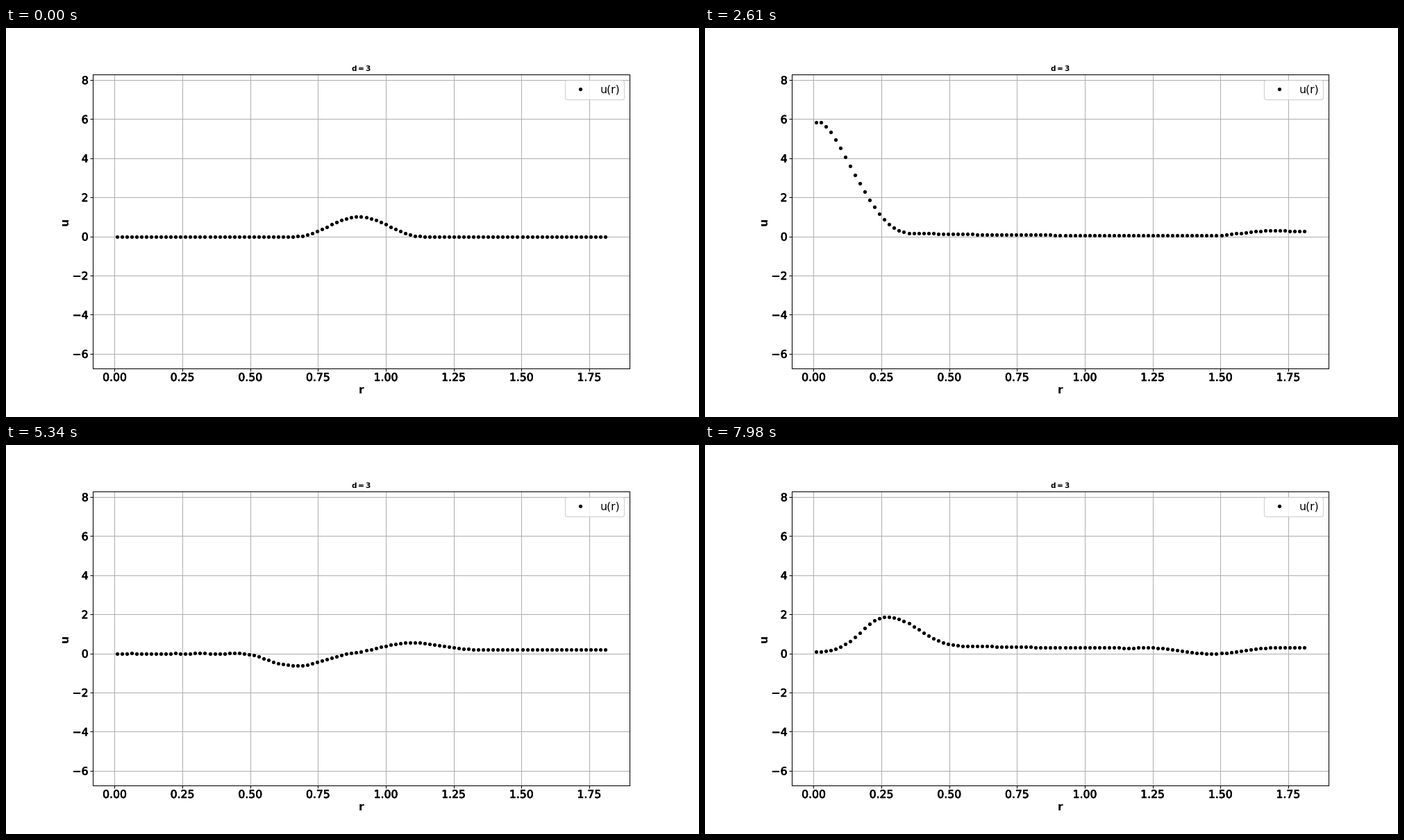
A matplotlib script for the animation above (8 s loop, 998 px wide and 561 px high).

```python
import numpy as np
import matplotlib.pyplot as plt
from matplotlib import patheffects
from matplotlib.animation import FuncAnimation

W, H, DPI = 998, 561, 100
FRAMES, INTERVAL = 267, 30

# Radial wave equation u_tt = u_rr + (d - 1)/r u_r with flat ends
DIM = 3
N = 101
DR = 0.018
DT = DR / 2
CENTRE, HALF_WIDTH = 0.9, 0.2525
PUSH = 0.62  # initial velocity relative to the initial shape

r = (np.arange(N) + 0.5) * DR


def bump(x):
    q = ((x - CENTRE) / HALF_WIDTH) ** 2
    return np.clip(1 - q, 0, None) ** 3


def laplacian(u):
    out = np.zeros_like(u)
    out[1:-1] = ((u[2:] - 2 * u[1:-1] + u[:-2]) / DR**2
                 + (DIM - 1) / r[1:-1] * (u[2:] - u[:-2]) / (2 * DR))
    return out


def flat_ends(u):
    u[0], u[-1] = u[1], u[-2]
    return u


def solve(steps):
    u = np.zeros((steps, N))
    u[0] = bump(r)
    u[1] = flat_ends(u[0] + DT * PUSH * u[0] + DT**2 / 2 * laplacian(u[0]))
    for n in range(1, steps - 1):
        u[n + 1] = flat_ends(2 * u[n] - u[n - 1] + DT**2 * laplacian(u[n]))
    return u


wave = solve(FRAMES)

plt.rcParams["font.family"] = "DejaVu Sans"
FONT = 11.25

fig = plt.figure(figsize=(W / DPI, H / DPI), dpi=DPI, facecolor="white")
ax = fig.add_axes([0.125, 0.125, 0.775, 0.755])

# Vertical scale: 28.2 px per unit, zero line 260.458 px above the bottom
UNIT, ZERO = 28.2, 260.458
ax.set_xlim(-0.081, 1.899)
ax.set_ylim((0.125 * H - ZERO) / UNIT, (0.88 * H - ZERO) / UNIT)
ax.set_xticks(np.arange(0, 1.76, 0.25))
ax.set_yticks(range(-6, 9, 2))
ax.grid(True, color="#b0b0b0", linewidth=0.75)
ax.set_axisbelow(True)
ax.tick_params(length=3.2, width=0.75, pad=1.2, labelsize=FONT)
for spine in ax.spines.values():
    spine.set_linewidth(0.75)
for label in ax.get_xticklabels() + ax.get_yticklabels():
    label.set_path_effects([patheffects.withStroke(linewidth=0.5,
                                                   foreground="black")])

ax.set_xlabel("r", fontsize=FONT, fontweight="bold", labelpad=2.2)
ax.set_ylabel("u", fontsize=FONT, fontweight="bold", labelpad=2.2)
ax.set_title(r"$\mathbf{d=3}$", fontsize=7.6, pad=3.8)

dots, = ax.plot(r, wave[0], "k.", markersize=5.6, markeredgewidth=0.94,
                label="u(r)")
legend = ax.legend(loc="upper right", fontsize=FONT)
legend.get_frame().set_linewidth(0.94)


def update(n):
    dots.set_ydata(wave[n])
    return dots,


anim = FuncAnimation(fig, update, frames=FRAMES, interval=INTERVAL,
                     repeat=True, repeat_delay=0, blit=False)
plt.show()
```
